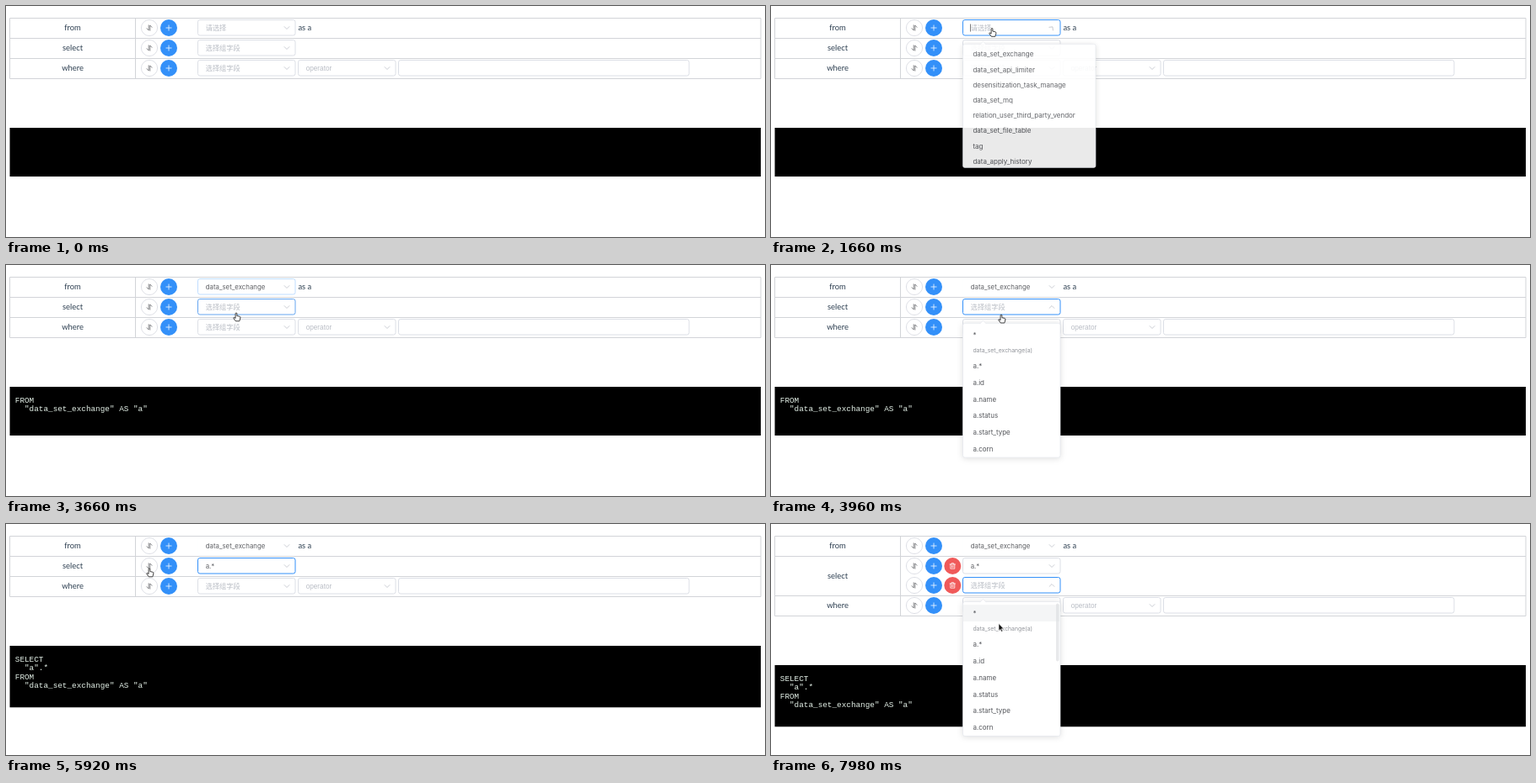
An HTML page that plays this animation: 900 px wide and 275 px high, repeating every 8000 ms.

```html
<!DOCTYPE html>
<html lang="en">
<head>
<meta charset="utf-8">
<title>Query builder</title>
<style>
  html, body { margin: 0; width: 100%; height: 100%; overflow: hidden; background: #fff; }
  svg { display: block; width: 900px; height: 275px; }
  text { white-space: pre; }
  .label { font: 9.4px Lato, "Open Sans", sans-serif; fill: #2c3e50; }
  .hint { font: 8.2px "Liberation Sans", "Noto Sans CJK SC", "Noto Sans CJK", sans-serif; fill: #b9bdc5; }
  .value { font: 7.85px Inter, sans-serif; fill: #606266; }
  .option { font: 8px Inter, sans-serif; fill: #55575c; }
  .group { font: 6.87px Inter, sans-serif; fill: #909399; }
  .sql { font: 9.35px "Liberation Mono", "Courier New", monospace; fill: #e6f3ea; }
  .line { fill: none; stroke: #d2d4d8; }
  .thin { fill: none; stroke-width: .75; stroke-linecap: round; stroke-linejoin: round; }
</style>
</head>
<body>
<svg id="stage" viewBox="0 0 900 275"></svg>
<script>
const LOOP = 8000, ADD_ROW = 6460, SHIFT = 23, ITEM = 19.83;
const stage = document.getElementById('stage');

function el(tag, attrs, parent = stage, text) {
  const node = document.createElementNS('http://www.w3.org/2000/svg', tag);
  set(node, attrs);
  if (text) node.textContent = text;
  return parent.appendChild(node);
}
function set(node, attrs) {
  for (const k in attrs) node.setAttribute(k, attrs[k]);
}
const show = (node, on) => set(node, { visibility: on ? 'inherit' : 'hidden' });
const label = (cls, x, y, text, parent, more) => el('text', { class: cls, x, y, ...more }, parent, text);
const clamp = v => Math.min(1, Math.max(0, v));

function bezier(x1, y1, x2, y2) {
  const at = (a, b, u) => 3 * a * u * (1 - u) ** 2 + 3 * b * u * u * (1 - u) + u ** 3;
  return p => {
    if (p <= 0 || p >= 1) return clamp(p);
    let lo = 0, hi = 1;
    for (let i = 0; i < 18; i++) {
      const mid = (lo + hi) / 2;
      if (at(x1, x2, mid) < p) lo = mid; else hi = mid;
    }
    return at(y1, y2, lo);
  };
}
const ease = bezier(.25, .1, .25, 1);
const zoom = bezier(.23, 1, .32, 1);
// 0 -> 1 after `on`, back to 0 after `off`
const toggle = (t, on, off, ms, curve) => curve((t - on) / ms) - curve((t - off) / ms);
const mix = (a, b, p) => a.map((v, i) => Math.round(v + (b[i] - v) * p));

function buttons(y, parent) {
  const circle = (x, r, fill, stroke) => {
    const g = el('g', { transform: `translate(${x} ${y})` }, parent);
    el('circle', { r, fill, stroke, 'stroke-width': .8 }, g);
    return g;
  };
  const icon = (g, d, stroke) => el('path', { class: 'thin', d, stroke }, g);
  icon(circle(170, 9.6, '#fff', '#d6d9e0'),
    'M-.8 -3.2V3L-3 .7M.8 3.2V-3L3 -.7', '#606266');
  icon(circle(193, 10, '#3390f9', 'none'), 'M-3.1 0H3.1M0 -3.1V3.1', '#fff');
  const bin = circle(215.3, 10, '#f05a5a', 'none');
  icon(bin, 'M-3.2 -2H3.2M-1.3 -2V-3.3H1.3V-2M-2.5 -2V3.2H2.5V-2M-.8 -.4V1.7M.8 -.4V1.7', '#fff');
  return bin;
}

function select(x, y, hint, parent, value) {
  const g = el('g', { transform: `translate(${x} ${y})` }, parent);
  const box = el('rect', { x: 0, y: -9.5, width: 115.5, height: 18.5, rx: 2.4, fill: '#fff', stroke: '#dcdfe6' }, g);
  const chevron = el('path', { class: 'thin', d: 'M-2.9 -1.4L0 1.5L2.9 -1.4', stroke: '#b9bdc5' }, g);
  const hintText = label('hint', 9.2, 2.9, hint, g);
  const valueText = label('value', 9.2, 2.7, value, g);
  set(chevron, { transform: 'translate(105.5 0)' });
  show(valueText, false);
  return { g, box, chevron, hintText, valueText };
}

function popper(y, width, items, parent) {
  const g = el('g', {}, parent);
  el('rect', { width, height: 160, rx: 2.4, fill: '#fff', stroke: '#e2e5eb', 'stroke-width': .7,
    style: 'filter:drop-shadow(0 1.2px 3.5px rgba(0,0,0,.13))' }, g);
  el('path', { d: 'M20.4 .6L24 -3.3L27.6 .6', fill: '#fff', stroke: '#e2e5eb', 'stroke-width': .6 }, g);
  const mark = el('rect', { x: .4, width: width - .8, height: ITEM, fill: '#f4f5f6' }, g);
  const tops = [];
  let top = 3.7;
  for (const item of items) {
    const isGroup = item.startsWith('#'), h = isGroup ? 17.5 : ITEM;
    tops.push(top);
    label(isGroup ? 'group' : 'option', 11.9, top + h / 2 + (isGroup ? 2.2 : 2.7), item.replace('#', ''), g);
    top += h;
  }
  const thumb = el('rect', { x: width - 5, y: 2, width: 3.5, height: 69, rx: 1.75, fill: '#dddee1', opacity: 0 }, g);
  return { g, y, mark, tops, thumb };
}

// table and fixed rows
const grid = el('path', { class: 'line' });
const middle = { 'text-anchor': 'middle' };
label('label', 79, 29, 'from', stage, middle);
const selectLabel = label('label', 79, 53, 'select', stage, middle);
buttons(26, stage).remove();
const bin1 = buttons(50, stage);
const extra = el('g', {});
buttons(73, extra);

const pick = '选择组字段';
const from = select(227.5, 26, '请选择', stage, 'data_set_exchange');
label('label', 346.4, 29, 'as a', stage);
const caret = el('path', { d: 'M9 -4.5V4.5', stroke: '#444', 'stroke-width': .7 }, from.g);
const col1 = select(227.5, 50, pick, stage, 'a.*');
const col2 = select(227.5, 73, pick, extra, '');

// everything below the select row
const lower = el('g', {});
label('label', 79, 77, 'where', lower, middle);
buttons(74, lower).remove();
select(227.5, 74, pick, lower, '');
select(346.5, 74, 'operator', lower, '');
el('rect', { x: 465.5, y: 64.5, width: 344.5, height: 18.5, rx: 2.4, fill: '#fff', stroke: '#dcdfe6' }, lower);
const panel = el('rect', { x: 4.5, y: 145, width: 890.5, height: 58 }, lower);
const sql = [0, 1, 2, 3].map(i => label('sql', 10.8, 163.8 + i * 10.45, '', lower));
const fromLines = ['FROM', '  "data_set_exchange" AS "a"'];
const script = [[0, []], [2900, fromLines], [5500, ['SELECT', '  "a".*', ...fromLines]]];

// drop-down lists
const tables = ['data_set_exchange', 'data_set_api_limiter', 'desensitization_task_manage', 'data_set_mq',
  'relation_user_third_party_vendor', 'data_set_file_table', 'tag', 'data_apply_history'];
const fields = ['*', '#data_set_exchange(a)', 'a.*', 'a.id', 'a.name', 'a.status', 'a.start_type', 'a.corn'];
const never = LOOP + 1000;
const widgets = [
  { ...from, list: popper(45.3, 157.5, tables), focus: [1500, 3580], hover: never,
    open: 1516, close: 2710, value: 2720, thumbAt: never, marks: [] },
  { ...col1, list: popper(69.3, 115.5, fields), focus: [3580, ADD_ROW], hover: 2850,
    open: 3690, close: 5340, value: 5360, thumbAt: 4060, marks: [[4060, 0], [5200, 2]] },
  { ...col2, list: popper(92.5, 115.5, fields), focus: [7580, never], hover: 7160,
    open: 7630, close: never, value: never, thumbAt: 7850, marks: [[7840, 0]] }
];

// pointer
const cursor = el('g', {});
const shapes = {
  arrow: el('path', { d: 'M0 0V8.6L2 6.9L3.3 9.8L4.7 9.2L3.4 6.3H6Z', fill: '#111', stroke: '#fff', 'stroke-width': .6 }, cursor),
  hand: el('path', { d: 'M-.9 .9a.9 .9 0 0 1 1.8 0V3.6l2.9 .6q1.3 .3 1.1 1.7l-.5 2.2l-.6 1.7H-.7L-3 6.6q-.6 -1 .4 -1.2l1.7 1Z',
    fill: '#fff', stroke: '#111', 'stroke-width': .8, 'stroke-linejoin': 'round' }, cursor),
  beam: el('path', { class: 'thin', stroke: '#111',
    d: 'M-1.6 -4.5Q0 -4.5 0 -3.5Q0 -4.5 1.6 -4.5M0 -3.6V3.6M-1.6 4.5Q0 4.5 0 3.5Q0 4.5 1.6 4.5' }, cursor)
};
const path = [
  [340, 380, 222], [480, 219, 118], [640, 219, 117], [1260, 262, 26.5], [1660, 262, 26.5],
  [2180, 264, 28], [2400, 264, 28], [2480, 273, 57], [3900, 273, 57], [4320, 273, 95],
  [4800, 272.6, 99.5], [5140, 271, 102], [5260, 268, 117], [5440, 268, 117], [5860, 170, 53],
  [6020, 170, 53], [6320, 196, 49], [6740, 196, 49], [7220, 257, 77.5], [7660, 257, 77.5],
  [7960, 270, 118.5]
];
const kinds = [[0, 'arrow'], [1180, 'hand'], [4290, 'beam'], [5200, 'hand'], [5660, 'arrow'], [5800, 'hand'],
  [6900, 'arrow'], [7080, 'hand'], [7920, 'arrow']];

const current = (steps, t) => steps.filter(s => s[0] <= t).pop();

function place(t) {
  const i = path.findIndex(k => k[0] > t);
  if (i < 0) return path[path.length - 1].slice(1);
  if (i === 0) return path[0].slice(1);
  const [a, b] = [path[i - 1], path[i]];
  const p = (t - a[0]) / (b[0] - a[0]), s = p * p * (3 - 2 * p);
  return [a[1] + (b[1] - a[1]) * s, a[2] + (b[2] - a[2]) * s];
}

function drawWidget(w, t) {
  const base = mix([220, 223, 230], [186, 190, 198], toggle(t, w.hover, w.focus[0], 200, ease));
  const lit = toggle(t, w.focus[0], w.focus[1], 200, ease);
  set(w.box, { stroke: `rgb(${mix(base, [51, 144, 249], lit)})` });
  const turn = toggle(t, w.open, w.close, 300, ease);
  set(w.chevron, { transform: `translate(105.5 0) rotate(${-180 * turn})` });
  show(w.hintText, t < w.value);
  show(w.valueText, t >= w.value);

  const { g, y, mark, tops, thumb } = w.list;
  const size = toggle(t, w.open + 28, w.close, 300, zoom);
  show(g, size > .005);
  set(g, { opacity: size, transform: `translate(227.5 ${y}) scale(1 ${Math.max(size, .001)})` });
  const hot = current(w.marks, t);
  show(mark, hot && size > .005);
  if (hot) set(mark, { y: tops[hot[1]] });
  set(thumb, { opacity: ease((t - w.thumbAt) / 340) });
}

function draw(t) {
  const added = t >= ADD_ROW, dy = added ? SHIFT : 0;
  set(grid, { d: `M4.5 14.5H895V${86.5 + dy}H4.5ZM4.5 38.5H895M4.5 ${62.5 + dy}H895M153.5 14.5V${86.5 + dy}` });
  set(selectLabel, { y: 53 + dy / 2 });
  set(lower, { transform: `translate(0 ${dy})` });
  show(bin1, added);
  show(extra, added);

  const lines = current(script, t)[1];
  sql.forEach((node, i) => { node.textContent = lines[i] || ''; });
  set(panel, { height: lines.length > 2 ? 73.3 : 58 });

  show(caret, t >= 1510 && t < 2100);
  widgets.forEach(w => drawWidget(w, t));

  show(cursor, t >= 340);
  set(cursor, { transform: `translate(${place(t)})` });
  const kind = current(kinds, t)[1];
  for (const k in shapes) show(shapes[k], k === kind);
}

const start = performance.now();
function tick() {
  draw((performance.now() - start) % LOOP);
  requestAnimationFrame(tick);
}
tick();

</script>
</body>
</html>
```
